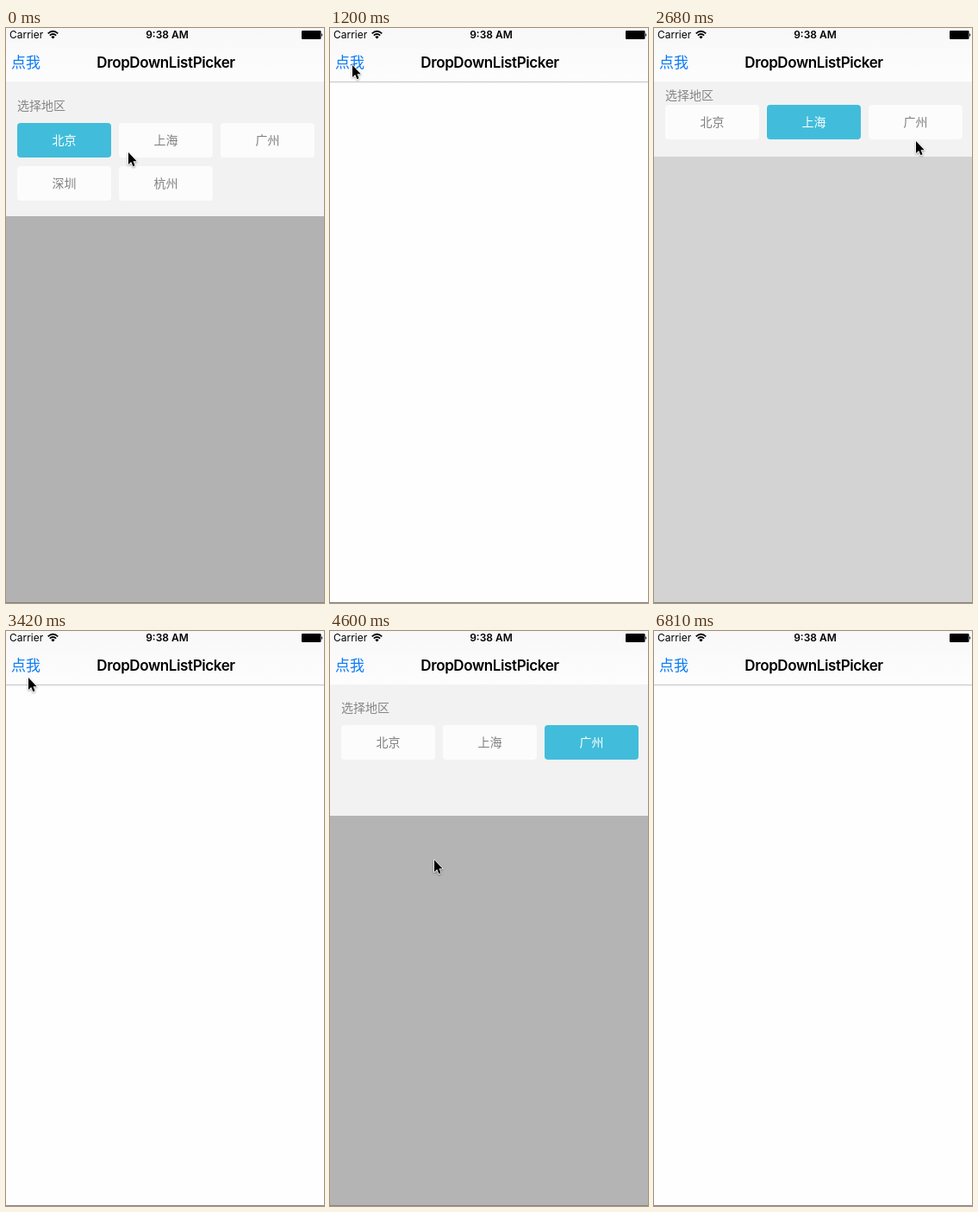
An HTML page that plays this animation: 369 by 666 pixels, repeating every 7.2 s.

```html
<!DOCTYPE html>
<html lang="zh-CN">
<head>
<meta charset="utf-8">
<title>DropDownListPicker</title>
<style>
  html, body { margin: 0; width: 100%; height: 100%; overflow: hidden; }
  #stage { position: relative; width: 369px; height: 666px; overflow: hidden; background: #fefefe;
    font-family: "Noto Sans CJK SC", "Noto Sans CJK", sans-serif; }
  #stage div, #stage svg { position: absolute; white-space: nowrap; }
  .latin { font-family: Inter, Roboto, sans-serif; color: #000; }
  #nav { left: 0; top: 0; width: 369px; height: 62px; background: linear-gradient(#f8f8f8, #fdfdfd); }
  #line { left: 0; top: 62px; width: 369px; height: 1px; background: #c4c4c4; }
  #edge { left: 0; top: 665px; width: 369px; height: 1px; background: #858585; }
  #carrier, #clock { top: 0; font-size: 12px; line-height: 16px; }
  #carrier { left: 4px; }
  #clock { left: 0; width: 374px; text-align: center; font-weight: 600; }
  #title { left: 0; top: 28px; width: 371px; text-align: center; font-size: 17px;
    font-weight: 600; line-height: 24px; letter-spacing: -0.4px; }
  #button { left: 6px; top: 27px; font-size: 17px; line-height: 24px; color: #0a7bf5; }
  #dim { left: 0; top: 62px; width: 369px; height: 604px; background: #000; }
  #panel { left: 0; top: 62px; width: 369px; overflow: hidden; background: #f2f2f2; }
  #label { left: 13px; font-size: 14px; line-height: 20px; color: #858585; }
  .cell { width: 109px; height: 40px; border-radius: 4px; background: #fcfcfc; color: #808080;
    font-size: 14px; line-height: 38px; text-align: center; }
  .cell.on { background: #41bddb; color: #fff; }
  #cursor { left: 0; top: 0; overflow: visible; filter: drop-shadow(0 1px 1px rgba(0,0,0,.35)); }
</style>
</head>
<body>
<div id="stage">
  <div id="dim"></div>
  <div id="panel"><div id="label">选择地区</div></div>
  <div id="nav">
    <div id="carrier" class="latin">Carrier</div>
    <svg style="left:48px;top:2px" width="13" height="11" fill="none" stroke="#000" stroke-width="1.7">
      <path d="M.7 4.4Q6.5-.9 12.3 4.4M2.8 6.7Q6.5 3.3 10.2 6.7"/>
      <path d="M6.5 10.4L4.3 8.2Q6.5 6.4 8.7 8.2Z" fill="#000" stroke="none"/>
    </svg>
    <div id="clock" class="latin">9:38 AM</div>
    <svg style="left:343px;top:3px" width="26" height="11">
      <rect width="22.5" height="10" rx="1.2"/>
      <path d="M23.2 3Q25.4 5 23.2 7Z"/>
    </svg>
    <div id="button">点我</div>
    <div id="title" class="latin">DropDownListPicker</div>
  </div>
  <div id="line"></div>
  <div id="edge"></div>
  <svg id="cursor" width="12" height="18">
    <path d="M0 0V14L3.2 11.1L5.4 16.2L7.6 15.2L5.5 10.2H9.7Z" fill="#000" stroke="#fff"
      stroke-width="1.6" stroke-linejoin="round" paint-order="stroke"/>
  </svg>
</div>
<script>
const LOOP = 7200, BEAT = 148, FULL = 156;
const $ = id => document.getElementById(id);

// cursor moves: first beat, number of beats, end x, end y
const moves = [
  [0, 1, 142, 144], [1, 1, 162, 140], [4, 5, 26, 43], [11, 3, 312, 107],
  [15, 2, 304, 131], [19, 2, 46, 75], [22, 2, 26, 54], [25, 1, 26, 43],
  [28, 2, 121, 265], [35, 1, 120, 257], [36, 3, 213, 354],
  [40, 2, 272, 612], [43, 4, 330, 690]
];

// panel slides: first beat, selected city, openness on each beat
const slides = [
  { beat: 0, city: 0, open: [1] },
  { beat: 3, city: 0, open: [.5, .05, 0] },
  { beat: 9, city: 1, open: [.55, .98, 1] },
  { beat: 18, city: 1, open: [.56, .06, 0] },
  { beat: 26, city: 2, open: [.55, .98, 1] },
  { beat: 31, city: 2, open: [.975, .4, 0] }
];

const cells = ["北京", "上海", "广州", "深圳", "杭州"].map((name, i) => {
  const cell = document.createElement("div");
  cell.className = "cell";
  cell.textContent = name;
  cell.style.left = 13 + i % 3 * 118 + "px";
  return $("panel").appendChild(cell);
});

function cursorAt(beat) {
  const i = moves.findLastIndex(m => m[0] <= beat);
  const [first, count, x, y] = moves[i];
  const [, , x0, y0] = moves[Math.max(i - 1, 0)];
  const part = Math.min((beat - first + 1) / count, 1);
  return [x0 + (x - x0) * part, y0 + (y - y0) * part].map(Math.round);
}

function draw(t) {
  const beat = Math.floor(t / BEAT);
  const [x, y] = cursorAt(beat);
  const slide = slides.findLast(s => s.beat <= beat);
  const open = slide.open[Math.min(beat - slide.beat, slide.open.length - 1)];
  const closing = slide.open.at(-1) === 0;

  $("cursor").style.transform = `translate(${x}px, ${y}px)`;
  $("button").style.opacity = closing ? 1 : open < .9 ? .4 : open < 1 ? .78 : 1;
  $("dim").style.opacity = .3 * open;
  $("line").style.display = open ? "none" : "";
  $("panel").style.height = Math.round(FULL * open) + "px";
  $("label").style.top = Math.round(28 * open) - 11 + "px";
  cells.forEach((cell, i) => {
    const row = Math.floor(i / 3);
    cell.style.top = Math.round((48 + 50 * row) * open) + "px";
    cell.style.display = row && closing ? "none" : "";
    cell.classList.toggle("on", i === slide.city);
  });
}

const start = performance.now();
function tick() {
  draw((performance.now() - start) % LOOP);
  requestAnimationFrame(tick);
}
tick();
</script>
</body>
</html>
```
